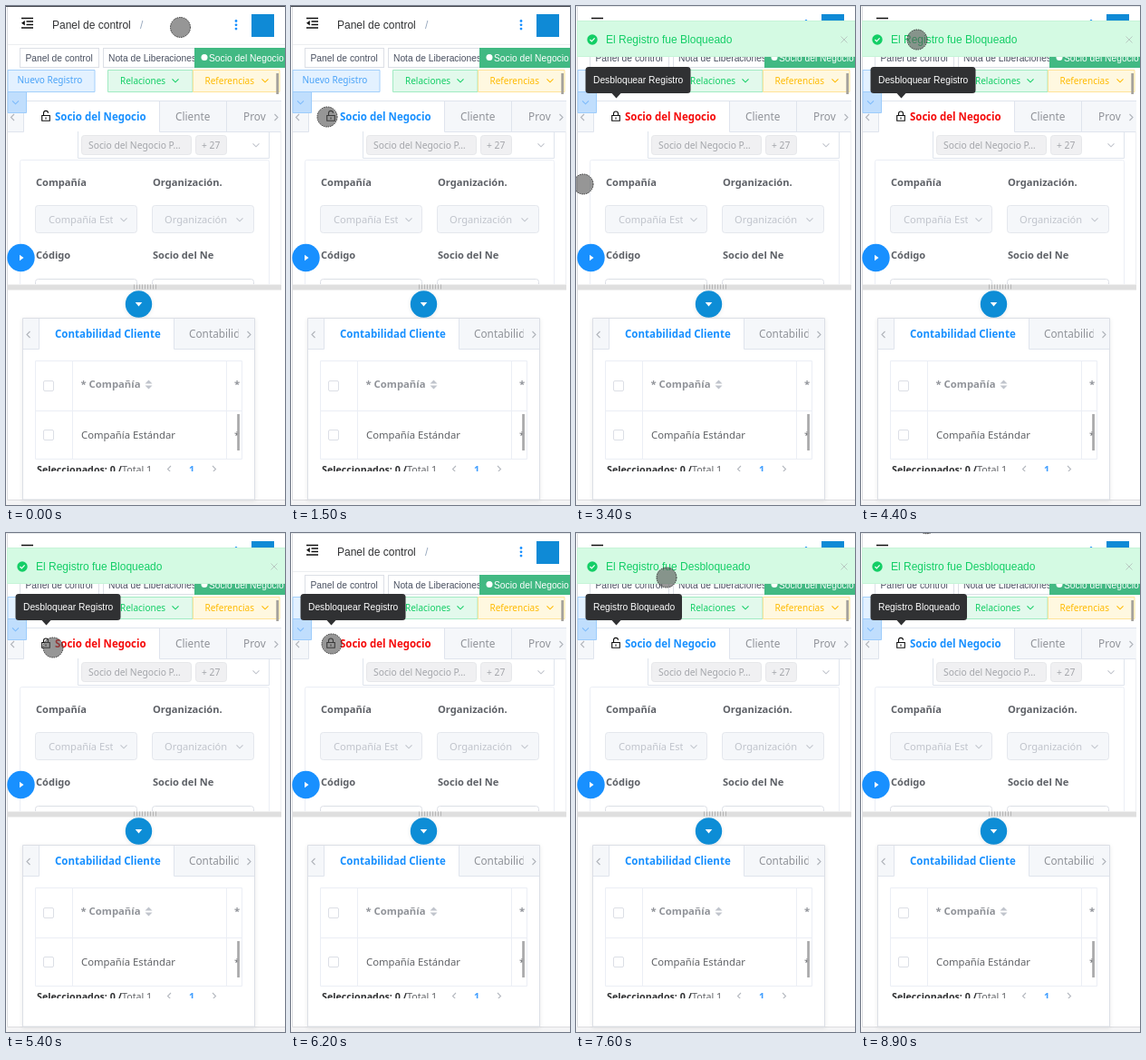
An HTML page that plays this animation: 308 px wide and 549 px high, repeating every 9.3 s.

```html
<!DOCTYPE html>
<html lang="es">
<head>
<meta charset="utf-8">
<style>
html, body { margin: 0; width: 100%; height: 100%; overflow: hidden; background: #fff; }
svg { display: block; width: 308px; height: 549px; font-family: "Noto Sans", sans-serif; }
text { white-space: pre; }
.ui { font-family: "Liberation Sans", Arial, sans-serif; font-size: 10.286px; }
.big { font-size: 12px; }
.btn { font-size: 10px; }
.tab { font-size: 11.8px; font-weight: 500; }
.active { font-size: 11.5px; font-weight: 600; }
.label { font-size: 11.1px; font-weight: 700; fill: #5d6066; }
.hint { font-size: 11.1px; fill: #c0c4cc; }
.chip { font-size: 10.3px; font-weight: 500; fill: #a4a6ab; }
.cell { font-size: 11.3px; fill: #606266; }
.head { font-size: 11.3px; font-weight: 600; fill: #909399; }
.page { font-size: 10.7px; fill: #606266; }
.line { fill: none; stroke: #dfe4ed; }
.soft { fill: none; stroke: #ebeef5; }
.off { fill: #f5f7fa; stroke: #e4e7ed; }
.box { fill: #fff; stroke: #dcdfe6; }
.icon { fill: none; stroke-width: 1.1; }
</style>
</head>
<body>
<svg viewBox="0 0 308 549">
  <defs>
    <path id="down" d="M-3.5-1.7 0 1.8 3.5-1.7"/>
    <path id="left" d="M2-3.5-1.5 0 2 3.5"/>
    <path id="right" d="M-2-3.5 1.5 0-2 3.5"/>
    <clipPath id="form"><path d="M0 138H304V306H0z"/></clipPath>
    <clipPath id="estClip"><path d="M40 220H118V250H40z"/></clipPath>
    <clipPath id="neClip"><path d="M160 260H229.500V290H160z"/></clipPath>
    <clipPath id="provClip"><path d="M250 105H287V137H250z"/></clipPath>
    <clipPath id="noteClip"><path d="M107 46H209V68H107z"/></clipPath>
    <clipPath id="childClip"><path d="M190 345H256.500V377H190z"/></clipPath>
    <clipPath id="pageClip"><path d="M30 500H262V512H30z"/></clipPath>
    <filter id="shade" x="-20%" y="-20%" width="140%" height="140%">
      <feDropShadow dx="0" dy="1" stdDeviation="2" flood-opacity=".09"/>
    </filter>
  </defs>

  <!-- window edges -->
  <path d="M0 543.5H308V549H0z" fill="#f4f4f5"/>
  <path d="M1.5 0V543.5H308" fill="none" stroke="#dcdde0"/>
  <path id="edge" d="M0 0H308V1H0z"/>

  <!-- header -->
  <path d="M17 13.5H30M22.500 17H30M22.500 20.500H30M17 24H30" stroke="#111" stroke-width="1.4"/>
  <path d="M17 18.700 20.800 16V21.500z" fill="#111"/>
  <text class="ui big" x="51" y="25" fill="#303133">Panel de control</text>
  <text class="ui big" x="148" y="25" fill="#97a8be">/</text>
  <g fill="#1890ff"><circle cx="254" cy="16.500" r="1.400"/><circle cx="254" cy="20.800" r="1.400"/><circle cx="254" cy="25.100" r="1.400"/></g>
  <rect x="271" y="9" width="25" height="25" fill="#0f8ad6"/>
  <path d="M2 42.500H308" stroke="#eceef0"/>

  <!-- page tags -->
  <g class="ui" fill="#495060">
    <rect class="box" x="15.500" y="46.500" width="87" height="21"/>
    <text x="21.500" y="61">Panel de control</text>
    <rect class="box" x="107.500" y="46.500" width="102" height="21"/>
    <text x="113" y="61" clip-path="url(#noteClip)">Nota de Liberaciones</text>
    <rect x="208" y="46" width="100" height="22" fill="#42b983"/>
    <circle cx="219" cy="56.500" r="3.500" fill="#fff"/>
    <text x="224" y="61" fill="#fff">Socio del Negocio</text>
  </g>

  <!-- actions -->
  <g class="btn">
    <path d="M2 70.500H98V94.500H2z" fill="#e3f1ff" stroke="#a3d0fb"/>
    <text x="12.500" y="85" fill="#4aa3f8">Nuevo Registro</text>
    <path d="M112.500 70.500H206V94.500H112.500z" fill="#e2f9ec" stroke="#a1ebc2"/>
    <text x="126" y="86" fill="#13ce66">Relaciones</text>
    <use href="#down" class="icon" x="187" y="82" stroke="#13ce66"/>
    <path d="M206.500 70.500H302V94.500H206.500z" fill="#fff8e0" stroke="#ffe399"/>
    <text x="219.500" y="86" fill="#ffba00">Referencias</text>
    <use href="#down" class="icon" x="286" y="82" stroke="#ffba00"/>
    <rect x="298.300" y="74" width="2.700" height="23" fill="#a5a29c"/>
  </g>

  <!-- main tabs -->
  <path d="M2 104.500H304V138H2z" fill="#f5f7fa"/>
  <path class="line" d="M2 104.500H304M2 138.500H19.500V104.500M169.500 104.500V138.500H304M243.500 104.500V138"/>
  <path d="M20 105H169V139H20z" fill="#fff"/>
  <path d="M2 94.500H22.500V117.500H2z" fill="#c0defd" stroke="#9dccfb"/>
  <use href="#down" class="icon" x="10.500" y="106" stroke="#7dbbfb"/>
  <g class="icon" stroke="#b0b4bb"><use href="#left" x="7" y="122.500"/><use href="#right" x="298.500" y="122.500"/></g>
  <path d="M39.700 120.500H48.300V126.300H39.700z" fill="none" stroke="#111" stroke-width="1.100"/>
  <path d="M44 122.500V124.500" stroke="#111" stroke-width="1.100"/>
  <path id="shackle" fill="none" stroke="#111" stroke-width="1.100"/>
  <g class="tab" fill="#909399">
    <text id="title" class="active" x="54" y="126">Socio del Negocio</text>
    <text x="187" y="126">Cliente</text>
    <text x="262" y="126" clip-path="url(#provClip)">Proveedor</text>
  </g>

  <!-- form -->
  <g clip-path="url(#form)">
    <path class="line" d="M79.500 138V167.500H290.500V138"/>
    <g fill="#f0f0f2" stroke="#e6e7ea">
      <rect x="83.500" y="142.500" width="121" height="21" rx="3"/><rect x="209.500" y="142.500" width="34" height="21" rx="3"/>
    </g>
    <text class="chip" x="91" y="156.500">Socio del Negocio P…</text>
    <text class="chip" x="216" y="156.500">+ 27</text>
    <rect class="soft" x="15.500" y="169.500" width="275" height="150" rx="2"/>
    <text class="label" x="33" y="198">Compañía</text>
    <text class="label" x="162" y="198">Organización.</text>
    <rect class="off" x="32.500" y="219.500" width="112" height="30" rx="3"/>
    <rect class="off" x="161.500" y="219.500" width="112" height="30" rx="3"/>
    <text class="hint" x="47" y="239" clip-path="url(#estClip)">Compañía Estándar</text>
    <text class="hint" x="175" y="239">Organización</text>
    <g class="icon" stroke="#c0c4cc"><use href="#down" x="276" y="153"/><use href="#down" x="130" y="235"/><use href="#down" x="258" y="235"/></g>
    <text class="label" x="33" y="277.500">Código</text>
    <text class="label" x="162" y="277.500" clip-path="url(#neClip)">Socio del Negocio</text>
    <rect class="box" x="32.500" y="300.500" width="112" height="30" rx="3"/>
    <rect class="box" x="161.500" y="300.500" width="112" height="30" rx="3"/>
  </g>
  <path d="M303.500 138V306" stroke="#eef0f3"/>
  <circle cx="16.500" cy="277" r="15.200" fill="#1890ff"/>
  <path d="M15 273.700 19.500 277 15 280.300z" fill="#fff"/>

  <!-- splitter -->
  <path d="M2 306.500H304V312.500H2z" fill="#dfdfdf"/>
  <path d="M141 309H167" stroke="#b5b5b5" stroke-width="5" stroke-dasharray="1 2"/>
  <g filter="url(#shade)"><circle cx="146.500" cy="328" r="14.700" fill="#0d8dd6"/></g>
  <path d="M142.700 326H150.300L146.500 330.500z" fill="#fff"/>

  <!-- detail panel -->
  <g filter="url(#shade)"><path d="M18.500 343.500H274.500V543H18.500z" fill="#fff" stroke="#dcdfe6"/></g>
  <path d="M19 344H274V377H19z" fill="#f5f7fa"/>
  <path d="M37 344H185V378H37z" fill="#fff"/>
  <path class="line" d="M19 377.500H36.500V344M185.500 344V377.500H274"/>
  <g class="icon" stroke="#b0b4bb"><use href="#left" x="24.500" y="361.500"/><use href="#right" x="268.500" y="361.500"/></g>
  <text class="active" x="54" y="365" fill="#1890ff">Contabilidad Cliente</text>
  <text class="tab" x="202" y="365" fill="#909399" clip-path="url(#childClip)">Contabilidad Proveedor</text>
  <path class="soft" d="M32.500 390.500H260.500V498.500H32.500zM32.500 445.500H260.500M73.500 390V498M243.500 390V498"/>
  <rect class="box" x="41.500" y="412.500" width="11" height="11" rx="1.500"/>
  <rect class="box" x="41.500" y="466.500" width="11" height="11" rx="1.500"/>
  <text class="head" x="82.500" y="420">* Compañía</text>
  <path d="M153.500 415.500 157.500 411.500 161.500 415.500zM153.500 417.500H161.500L157.500 421.500z" fill="#c0c4cc"/>
  <text class="head" x="252" y="420">*</text>
  <text class="cell" x="83" y="476">Compañía Estándar</text>
  <text class="cell" x="252" y="476">*</text>
  <rect x="255.200" y="449" width="2.700" height="40" fill="#a9a9aa"/>
  <g class="page" clip-path="url(#pageClip)">
    <text x="34" y="513.500" font-weight="700" fill="#303133">Seleccionados: 0 /</text>
    <text x="128" y="513.500">Total 1</text>
    <text x="202" y="513.500" font-weight="700" fill="#409eff">1</text>
    <g class="icon" stroke="#b4b8bf"><use href="#left" x="180" y="509.500"/><use href="#right" x="230" y="509.500"/></g>
  </g>

  <!-- overlays -->
  <g id="tip">
    <rect id="tipBox" x="10.500" y="67" height="29" rx="3.500" fill="#303133"/>
    <path d="M39.500 96H49.500L44.500 101.500z" fill="#303133"/>
    <text id="tipText" class="ui" x="19" y="85" fill="#fff"></text>
  </g>
  <g id="toast">
    <path d="M1.500 16.500H309V55.500H1.500z" fill="#d4fae3" stroke="#c6f4d8"/>
    <circle cx="18" cy="37" r="5.700" fill="#13ce66"/>
    <path d="M15.500 37 17.300 38.800 20.600 35.400" fill="none" stroke="#fff" stroke-width="1.200"/>
    <text id="toastText" class="ui big" x="33" y="41" fill="#13ce66"></text>
    <path d="M292.500 33.500 299.500 40.500M299.500 33.500 292.500 40.500" stroke="#b9cac2"/>
  </g>
  <circle id="cursor" r="11" fill="#555" fill-opacity=".62" stroke="#333" stroke-dasharray="1.500 1"/>
</svg>
<script>
const LOOP = 9300, STEP = 100;
const RED = [245, 10, 10], BLUE = [24, 144, 255];

// time, x, y
const path = [
  [0, 192.5, 23.5], [300, 192.5, 23.5], [700, 116, 72], [1100, 42.5, 128], [1200, 42.5, 128],
  [1300, 42.5, 126], [1400, 42.5, 126], [1500, 40, 122], [2100, 40, 122], [2400, 42, 126], [3300, 42, 126],
  [3400, 8, 196], [3900, 48, 105], [4300, 78, 37], [4400, 62, 37], [4500, 62, 37],
  [5000, 71, 80], [5400, 52, 126], [5500, 52, 126], [6200, 45, 122], [6300, 45, 122],
  [6600, 46, 126], [6700, 46, 126], [6900, 54, 133], [7400, 87, 49], [7500, 87, 49], [7600, 100, 49],
  [8000, 152, 34], [8300, 130, 13], [8500, 104, 10], [8700, 80, -1], [8800, 80, -1], [8900, 72.5, -10.3]
];

const get = id => document.getElementById(id);
const ramp = (t, from, to) => Math.min(1, Math.max(0, (t - from) / (to - from)));
const mix = (a, b, k) => a + (b - a) * k;

function place(t) {
  const i = path.findIndex(p => p[0] > t);
  if (i < 0) return path[path.length - 1].slice(1);
  const [a, b] = [path[i - 1], path[i]];
  const k = ramp(t, a[0], b[0]);
  return [mix(a[1], b[1], k), mix(a[2], b[2], k)];
}

function draw(t) {
  const locked = t >= 3400 && t < 6400;
  const asksUnlock = t >= 3400 && t < 6800;

  get("edge").setAttribute("fill", t < 2000 ? "#43474d" : "#e6e8ea");
  get("shackle").setAttribute("d", locked
    ? "M41.500 120.500V118.500A2.500 2.500 0 0 1 46.500 118.500V120.500"
    : "M41.500 120.500V118A2.500 2.500 0 0 1 46.500 117.700");

  const hue = t < 3400 ? 1 : ramp(t, 6300, 6600);
  get("title").setAttribute("fill", `rgb(${RED.map((c, i) => mix(c, BLUE[i], hue))})`);

  get("tip").setAttribute("opacity", ramp(t, 2100, 2400));
  get("tipBox").setAttribute("width", asksUnlock ? 116 : 106.5);
  get("tipText").textContent = asksUnlock ? "Desbloquear Registro" : "Registro Bloqueado";

  const shown = t < 3400 ? 0 : t < 6700 ? 1 - ramp(t, 5500, 5900) : ramp(t, 6700, 7100);
  const eased = shown * shown * (3 - 2 * shown);
  get("toast").setAttribute("opacity", eased);
  get("toast").setAttribute("transform", `translate(0 ${-22 * (1 - eased)})`);
  get("toastText").textContent = "El Registro fue " + (t < 6700 ? "Bloqueado" : "Desbloqueado");

  get("cursor").setAttribute("transform", `translate(${place(t)})`);
}

const start = performance.now();
function tick() {
  const t = (performance.now() - start) % LOOP;
  draw(Math.floor(t / STEP) * STEP);
  requestAnimationFrame(tick);
}
tick();
</script>
</body>
</html>
```
